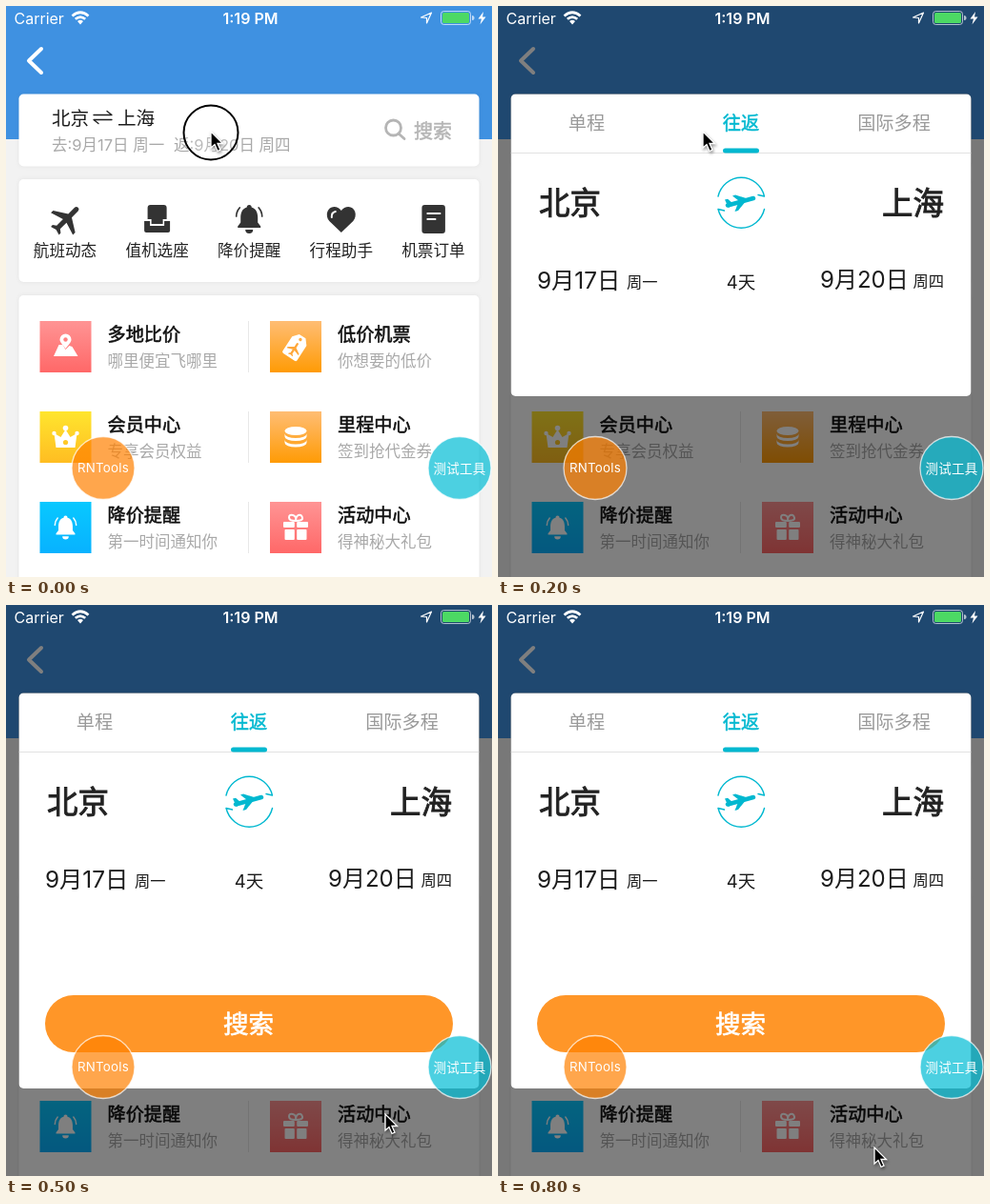
These frames come from a looping animation (510x600 px, 900 ms). An HTML page:

```html
<!DOCTYPE html>
<html lang="zh-CN">
<head>
<meta charset="utf-8">
<style>
html, body { margin: 0; width: 100%; height: 100%; overflow: hidden; }
svg { display: block; width: 100%; height: 100%; font-family: Inter, "Noto Sans CJK SC", "Noto Sans CJK", sans-serif; }
.line { fill: none; stroke-linecap: round; stroke-linejoin: round; }
.card { fill: #fff; filter: drop-shadow(0 0 2px #0001); }
#cursor { filter: drop-shadow(1px 2px 1.5px #0006); }
</style>
</head>
<body>
<svg id="stage" viewBox="0 0 510 600"></svg>
<script>
const DARK = '#1c1c1c', GREY = '#a9a9a9', INK = '#333', CYAN = '#00b8d0';
const STEP = 100;
const panelHeights = [0, 92.5, 317.5, 415.5];
const cursorPath = [[215, 132], [215, 132], [215, 132], [215, 132], [331, 392], [398, 535], [398, 553], [396, 565], [395, 570]];

// Text placed by its vertical centre; weight 500 is a regular face thickened by a thin outline
const text = (x, cy, size, str, fill = DARK, weight = 400, anchor = 'start') =>
  `<text x="${x}" y="${cy + size * .375}" font-size="${size}" fill="${fill}" font-weight="${weight === 500 ? 400 : weight}"
    text-anchor="${anchor}" ${weight === 500 ? `stroke="${fill}" stroke-width="${size * .028}"` : ''}>${str}</text>`;
const rect = (x, y, w, h, fill, r = 0, extra = '') =>
  `<rect x="${x}" y="${y}" width="${w}" height="${h}" rx="${r}" fill="${fill}" ${extra}/>`;
const line = (d, color, width) => `<path class="line" d="${d}" stroke="${color}" stroke-width="${width}"/>`;
const at = (x, y, body, more = '') => `<g transform="translate(${x} ${y}) ${more}">${body}</g>`;
const path = (d, fill) => `<path d="${d}" fill="${fill}"/>`;
const circle = (x, y, r, fill) => `<circle cx="${x}" cy="${y}" r="${r}" fill="${fill}"/>`;
const gradient = (id, top, bottom) =>
  `<linearGradient id="${id}" x2="0" y2="1"><stop stop-color="${top}"/><stop offset="1" stop-color="${bottom}"/></linearGradient>`;

const plane = fill => path('M9.5 4V2l-8-5v-5.5a1.5 1.5 0 0 0-3 0V-3l-8 5v2l8-2.5V7l-2 1.5V10L0 9l3.5 1V8.5L1.5 7V1.5z', fill);
const bell = fill => path('M0-15a2.5 2.5 0 0 1 2.5 2.5c5 1.5 6.5 6 6.5 11v5l3 4v1.5h-24v-1.5l3-4v-5c0-5 1.5-9.5 6.5-11a2.5 2.5 0 0 1 2.5-2.5z', fill)
  + path('M-4 11h8a4 4 0 0 1-8 0z', fill) + line('M-10-12q-3.5 4-3.5 9M10-12q3.5 4 3.5 9', fill, 1.7);

const icons = {
  flight: at(1.5, 0, plane(INK), 'rotate(45) scale(1.72)'),
  seat: path('M-10-12q0-3 3-3H7q3 0 3 3V0H6v5H-6V0h-4z', INK) + path('M-13.5 2h6v5h15V2h6v10q0 2-2 2h-23q-2 0-2-2z', INK),
  bell: bell(INK),
  heart: path('M0 14L-12.5 2c-5-6-2-15 5-15q4.500 0 7.5 4q3-4 7.5-4c7 0 10 9 5 15z', INK) + line('M-10-2q-.5-5 4-6', '#fff', 2),
  order: rect(-12, -15, 24.5, 30, INK, 3) + line('M-6-6H7M-6 0H2', '#fff', 2.2),
  map: path('M-12.5 10L-7-2h4L0 3l4-4 3 1 6 10z', '#fff')
    + path('M0 2c-4-5-6-7-6-9.5a6 6 0 0 1 12 0C6-5 4-3 0 2z', '#fff') + circle(0, -7.5, 2.2, '#ff8080'),
  tag: at(0, 0, path('M-9-7l5-6H4l5 6v18q0 2-2 2H-7q-2 0-2-2z', '#fff') + circle(0, -9, 1.7, '#ffae45')
    + at(0, 3, plane('#ffa73a'), 'scale(.75)'), 'rotate(33)'),
  crown: path('M-12-4l7 4 5-8 5 8 7-4-2 15h-20z', '#fff') + circle(0, 5.5, 2.6, '#ffc928')
    + circle(0, -9.5, 2.8, '#fff') + circle(-12, -4, 2.2, '#fff') + circle(12, -4, 2.2, '#fff'),
  coins: '<ellipse cy="-6.5" rx="11.5" ry="4.5" fill="#fff"/>'
    + [-3.5, 3].map(y => path(`M-11.5 ${y}v3a11.5 4.5 0 0 0 23 0v-3a11.5 4.5 0 0 1-23 0z`, '#fff')).join(''),
  alarm: at(0, 0, bell('#fff'), 'scale(.83)'),
  gift: rect(-13, -6, 11.8, 6, '#fff', 1) + rect(1.2, -6, 11.8, 6, '#fff', 1)
    + rect(-11.5, 2, 10.3, 11, '#fff', 1) + rect(1.2, 2, 10.3, 11, '#fff', 1)
    + line('M0-7q-7 0-7-3.5t4-2.5 3 6q0-5 3-6t4 2.5-7 3.5', '#fff', 2),
};

const shortcuts = [['flight', '航班动态'], ['seat', '值机选座'], ['bell', '降价提醒'], ['heart', '行程助手'], ['order', '机票订单']];
const features = [
  ['map', 'red', '多地比价', '哪里便宜飞哪里'], ['tag', 'orange', '低价机票', '你想要的低价'],
  ['crown', 'yellow', '会员中心', '专享会员权益'], ['coins', 'orange', '里程中心', '签到抢代金券'],
  ['alarm', 'blue', '降价提醒', '第一时间通知你'], ['gift', 'red', '活动中心', '得神秘大礼包'],
];

const feature = ([icon, color, title, note], i) => {
  const x = 35.5 + i % 2 * 241.5, y = 331 + (i >> 1) * 95;
  return rect(x, y, 54, 54, `url(#${color})`) + at(x + 27, y + 27, icons[icon])
    + text(x + 71, y + 14, 19.2, title, '#111', 500) + text(x + 71, y + 42, 16.5, note, GREY)
    + (i % 2 ? '' : rect(254, y, 1, 54, '#e8e8e8'));
};

const page = rect(0, 0, 510, 600, '#f2f2f2') + rect(0, 0, 510, 140, '#3f91e1')
  + line('M37 45L24 57.5L37 70', '#fff', 4)
  + rect(13.5, 92.5, 483, 76, '#fff', 5, 'class="card"')
  + text(48, 118, 19.6, '北京') + text(117, 118, 19.6, '上海')
  + line('M92 114.5H111L106 110.5M111 119.5H92L97 123.5', DARK, 1.3)
  + text(48, 146, 16.5, '去:9月17日 周一', GREY) + text(176, 146, 16.5, '返:9月20日 周四', GREY)
  + line('M413 135L418 139.5M398.5 128a8 8 0 1 0 16 0a8 8 0 1 0-16 0', '#b5b5b5', 2.8)
  + text(428, 131, 20, '搜索', '#b5b5b5', 500)
  + rect(13.5, 182, 483, 108, '#fff', 5, 'class="card"')
  + shortcuts.map(([icon, label], i) => at(62 + i * 96.6, 224, icons[icon]) + text(62 + i * 96.6, 257, 16.6, label, '#222', 400, 'middle')).join('')
  + rect(13.5, 304, 483, 310, '#fff', 5, 'class="card"')
  + features.map(feature).join('');

// Small side-on aircraft climbing to the right
const takeoff = line('M241 209.5L268 202', CYAN, 4.5)
  + path('M238 203.5l3-.8 5 4.300-4 5.200z', CYAN)
  + path('M246 199.5l3-1 13 4-7 4z', CYAN)
  + path('M252 207l9-3-9 11-3.500 1z', CYAN);
const panel = rect(13.5, 92.5, 483, 415.5, '#fff')
  + text(93, 123, 19.2, '单程', '#999', 400, 'middle') + text(255, 123, 19.2, '往返', CYAN, 500, 'middle')
  + text(415.5, 123, 19.2, '国际多程', '#999', 400, 'middle')
  + rect(13.5, 154, 483, 1, '#e2e2e2') + rect(236, 149.5, 38, 5, CYAN, 2.5)
  + text(43, 207, 32.5, '北京', '#222', 500) + text(468, 207, 32.5, '上海', '#222', 500, 'end')
  + line('M231 200A25 26 0 0 1 279.5 200L273 198.500M279.5 213.5A25 26 0 0 1 231 213.5L237.5 215', CYAN, 1.4)
  + takeoff
  + text(41, 288, 24.3, '9月17日') + text(135, 290, 16.3, '周一')
  + text(255, 290, 18.5, '4天', DARK, 400, 'middle')
  + text(338, 287, 24, '9月20日') + text(468, 289, 16.3, '周四', DARK, 400, 'end')
  + rect(41, 410, 428, 60, '#ff9628', 30) + text(254.5, 440, 26.5, '搜索', '#fff', 500, 'middle');

const floating = (x, color, label, size) =>
  `<circle cx="${x}" cy="485.5" r="33" fill="${color}" fill-opacity=".7" stroke="#fff" stroke-opacity=".7" stroke-width="1.3"/>`
  + text(x, 485.5, size, label, '#fff', 400, 'middle');

const statusBar = text(8.5, 12.5, 16, 'Carrier', '#fff') + text(256.5, 12.5, 16, '1:19 PM', '#fff', 600, 'middle')
  + `<path d="M69.5 10.5Q78 3 86.5 10.5M72.8 13.8Q78 9.3 83.2 13.8" fill="none" stroke="#fff" stroke-width="2.7"/>`
  + path('M75 16Q78 13.5 81 16L78 19.5z', '#fff')
  + line('M435.5 12L446.5 7L441.5 18V12.5z', '#fff', 1.2)
  + rect(456.5, 5.5, 31, 14, 'none', 3, 'stroke="#fff" stroke-opacity=".65"') + rect(458, 7, 28, 11, '#4cd964', 1.5)
  + path('M489 10q2.5 0 2.5 2.5t-2.5 2.5z', '#fffa') + path('M501 6l-5.5 7.5h3.5l-1.5 6 6-8h-3.5z', '#fff');

const pointer = '<path d="M0 0V17L4 13.5L7 20.5L10 19.2L7 12.5H12.5Z" fill="#000" stroke="#fff" stroke-width="1.3"/>';

const stage = document.getElementById('stage');
stage.innerHTML = `<defs>
  ${gradient('red', '#ff9494', '#ff6868')}${gradient('orange', '#ffbd74', '#ff9b05')}
  ${gradient('yellow', '#ffe52e', '#ffbd22')}${gradient('blue', '#08c8ff', '#08b2ff')}
  <clipPath id="reveal"><rect id="window" x="13.5" y="92.5" width="483" rx="5"/></clipPath></defs>
  ${page}
  <g id="modal">${rect(0, 0, 510, 600, '#000', 0, 'opacity=".5"')}<g clip-path="url(#reveal)">${panel}</g></g>
  <g letter-spacing=".25">${floating(102, '#ff8000', 'RNTools', 13.3)}${floating(476, '#00bcd4', '测试工具', 13.5)}</g>
  ${statusBar}
  <circle id="ring" cx="215" cy="133" r="28.5" fill="#fff" fill-opacity=".2" stroke="#000" stroke-width="2"/>
  <g id="cursor">${pointer}</g>`;

const [modal, reveal, ring, cursor] = ['modal', 'window', 'ring', 'cursor'].map(id => document.getElementById(id));

function draw() {
  const step = Math.floor(performance.now() / STEP) % cursorPath.length;
  modal.style.display = step ? '' : 'none';
  ring.style.display = step ? 'none' : '';
  reveal.setAttribute('height', panelHeights[Math.min(step, 3)]);
  cursor.setAttribute('transform', `translate(${cursorPath[step]})`);
  requestAnimationFrame(draw);
}
draw();
</script>
</body>
</html>
```
